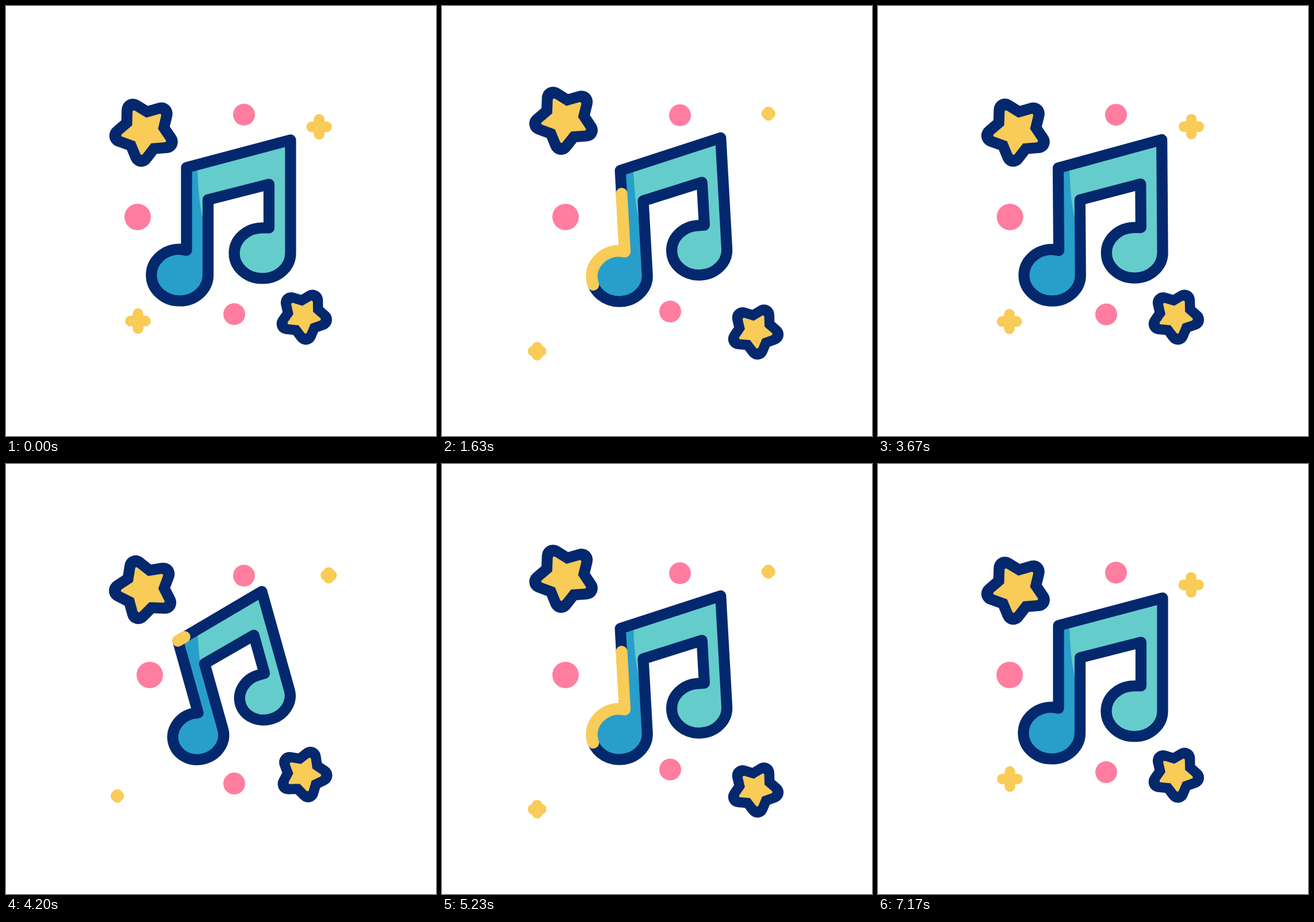
These frames come from a looping animation (748 by 748 pixels, 7.2 s). An HTML page with a canvas:

```html
<!DOCTYPE html>
<html lang="en">
<head>
<meta charset="utf-8">
<title>Dancing note</title>
<style>
html, body { margin: 0; height: 100%; overflow: hidden; background: #fff; }
canvas { display: block; width: 748px; height: 748px; }
</style>
</head>
<body>
<canvas id="stage" width="748" height="748"></canvas>
<script>
const ctx = document.getElementById('stage').getContext('2d');
const NAVY = '#04286e', TEAL = '#65cccc', BLUE = '#279fca', YELLOW = '#f9cb57', PINK = '#ff7d9f';
const CYCLE = 3600, PEN = 19.2, CENTER = 374;
const DIP = 690, PEAK = 1150, REBOUND = 1720, REST = 2150;

// Sine ease from 0 to 1 between two times.
function ease(t, start, end) {
  const u = Math.min(1, Math.max(0, (t - start) / (end - start)));
  return (1 - Math.cos(Math.PI * u)) / 2;
}

// Every part dances to the same beat: dip, peak, rebound, rest.
function swing(t, dip, peak, rebound) {
  return dip * ease(t, 0, DIP)
    + (peak - dip) * ease(t, DIP, PEAK)
    + (rebound - peak) * ease(t, PEAK, REBOUND)
    - rebound * ease(t, REBOUND, REST);
}

const OUTLINE = 'M314 281 L495 233 V430 A49 44 0 1 1 446 386 H457.5 V310 L351.5 337 V468 ' +
  'A49.3 45 0 1 1 302 423 L314 425 Z';
const note = new Path2D(OUTLINE);
const shade = new Path2D('M200 240 H333 Q331 335 346 385 L390 440 V540 H200 Z');
const ruler = document.createElementNS('http://www.w3.org/2000/svg', 'path');
ruler.setAttribute('d', OUTLINE);
const noteLength = ruler.getTotalLength();

function dot(x, y, r) {
  ctx.fillStyle = PINK;
  ctx.beginPath();
  ctx.arc(x, y, r, 0, 2 * Math.PI);
  ctx.fill();
}

function spark(x, y, arm) {
  ctx.strokeStyle = YELLOW;
  ctx.lineWidth = 18.5;
  ctx.beginPath();
  ctx.moveTo(x - arm, y);
  ctx.lineTo(x + arm, y);
  ctx.moveTo(x, y - arm);
  ctx.lineTo(x, y + arm);
  ctx.stroke();
}

function paintStar(x, y, radius, degrees, color, width) {
  ctx.beginPath();
  for (let i = 0; i < 10; i++) {
    const a = (degrees + i * 36) * Math.PI / 180, r = i % 2 ? radius * .55 : radius;
    ctx.lineTo(x + r * Math.cos(a), y + r * Math.sin(a));
  }
  ctx.closePath();
  ctx.strokeStyle = ctx.fillStyle = color;
  ctx.lineWidth = width;
  ctx.stroke();
  ctx.fill();
}

function star(x, y, core, rim, degrees) {
  paintStar(x, y, core + 4, degrees, NAVY, rim);
  paintStar(x, y, core, degrees, YELLOW, 5);
}

function drawNote(t) {
  const scale = 1 + swing(t, -.1, .15, -.03);
  ctx.save();
  ctx.translate(CENTER, CENTER);
  ctx.rotate(swing(t, -16.3, 15.8, -4.4) * Math.PI / 180);
  ctx.scale(scale, scale);
  ctx.translate(-CENTER, -CENTER);
  ctx.fillStyle = TEAL;
  ctx.fill(note);

  // The shaded side stays upright while the note tilts.
  ctx.save();
  ctx.clip(note);
  ctx.resetTransform();
  ctx.fillStyle = BLUE;
  ctx.fill(shade);
  ctx.restore();

  // The pen keeps its width while the note grows and shrinks.
  ctx.lineWidth = PEN / scale;
  ctx.strokeStyle = NAVY;
  ctx.stroke(note);

  const head = ease(t, 515, 1775) * noteLength, tail = ease(t, 700, 2000) * noteLength;
  if (head > tail) {
    ctx.lineWidth = (PEN + 1) / scale;
    ctx.strokeStyle = YELLOW;
    ctx.setLineDash([head - tail, noteLength * 2]);
    ctx.lineDashOffset = -tail;
    ctx.stroke(note);
  }
  ctx.restore();
}

function draw(now) {
  const t = now % CYCLE;
  ctx.fillStyle = '#fff';
  ctx.fillRect(0, 0, 748, 748);
  ctx.lineCap = ctx.lineJoin = 'round';

  drawNote(t);
  dot(414, 189 + swing(t, 5.5, -28.3, 2.9), 19);
  dot(229 + swing(t, 22, -47, -12), 367, 23);
  dot(397, 536 + swing(t, 20.7, 52, -8), 19);

  const right = swing(t, 17.4, -1.7, 24.6), left = swing(t, 37.4, 4.2, 67.8);
  spark(544.7 + right, 210.3 - right, 13 + swing(t, -8.4, 11, -11.3));
  spark(229.5 - left, 548 + left * .82, 13 + swing(t, -11, 2.7, -6.6));

  const out = 60 * (ease(t, 600, 1270) - ease(t, 1270, 1960));
  const spin = swing(t, 7.6, 26.5, -1.1);
  star(241 - out, 218 - out * .74, 38.5, 39, 97.5 + spin);
  star(517.7 + out * .97, 539.5 + out * .93, 28, 36, 83.2 - spin);
}

const begin = performance.now();
function tick() {
  draw(performance.now() - begin);
  requestAnimationFrame(tick);
}
tick();
</script>
</body>
</html>
```
